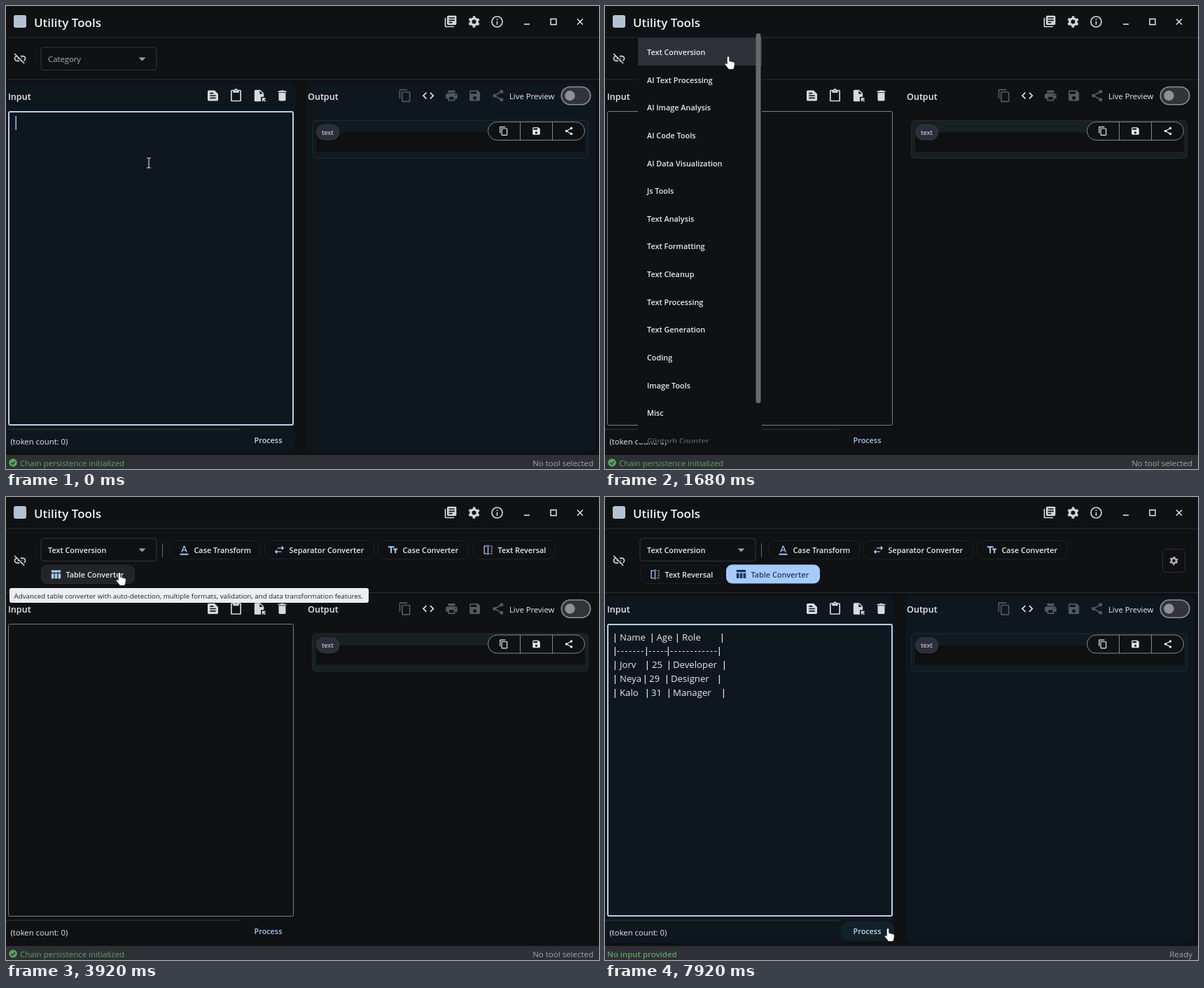
An HTML page that plays this animation: 847x661 px, repeating every 8 s.

```html
<!DOCTYPE html>
<html lang="en">
<head>
<meta charset="utf-8">
<title>Utility Tools</title>
<style>
  html, body { margin: 0; width: 100%; height: 100%; overflow: hidden; background: #0f1113; }
  svg { display: block; }
  text { font: 500 11.3px "Open Sans", "Noto Sans", sans-serif; fill: #e8eaee; white-space: pre; }
  text.title { font-size: 17px; font-weight: 600; fill: #f2f4f6; }
  text.head { font-size: 12.6px; font-weight: 600; }
  text.label { font-size: 10.85px; font-weight: 600; }
  text.status { font-size: 11.5px; fill: #5ea463; }
  text.strong { font-size: 11.4px; font-weight: 600; }
  text.end { text-anchor: end; fill: #a3a5ab; }
  text.tag { font-size: 9.5px; }
  text.tip { font-size: 9.8px; font-weight: 400; fill: #1f2226; }
  text.cell { font-size: 13.2px; }
  text.bar { font-size: 13.2px; font-weight: 600; text-anchor: middle; }
  text.rule { font-size: 13.2px; letter-spacing: 1.45px; }
  .line { fill: none; stroke: #2a2c30; }
  .chip rect { fill: transparent; stroke: #1e2226; }
  .chip { color: #a9c9f7; }
  .chip.hover rect { fill: #222428; stroke: #2a2c30; }
  .chip.on { color: #16365f; }
  .chip.on rect { fill: #a8cbfd; stroke: #a8cbfd; }
  .chip.on text { fill: #1c3c64; }
  .panel { fill: #0f171e; }
  .card { fill: #172120; stroke: #222b2c; }
  .tint .card { fill: #101b21; stroke: #1f2a30; }
  #process { fill: #a9c9f9; }
  .tint #process { fill: #c9d6e8; }
  #field { fill: none; stroke: #7b7e82; }
  .focus #field { stroke: #f0f2f4; }
  .tint #field { stroke: #b9cfee; }
</style>
</head>
<body>
<svg id="stage" width="847" height="661" viewBox="0 0 847 661"></svg>
<script>
const LOOP = 8000, STEP = 80;
const stage = document.getElementById('stage');

const glyphs = {
  library: 'M4 6H2v14c0 1.1.9 2 2 2h14v-2H4zM20 2H8c-1.1 0-2 .9-2 2v12c0 1.1.9 2 2 2h12c1.1 0 2-.9 2-2V4c0-1.1-.9-2-2-2zm-1 9H9V9h10zm-4 4H9v-2h6zm4-8H9V5h10z',
  unlink: 'M17 7h-4v1.9h4c1.7 0 3.1 1.4 3.1 3.1 0 1.4-1 2.6-2.3 3l1.4 1.4C20.900 15.600 22 14 22 12c0-2.800-2.200-5-5-5zm-1 4h-2.200l2 2h.2zM2 4.300l3.100 3.100C3.300 8.100 2 9.900 2 12c0 2.800 2.200 5 5 5h4v-1.900H7c-1.700 0-3.100-1.400-3.100-3.100 0-1.600 1.200-2.900 2.800-3.100l2 2.100H8v2h2.700l2.300 2.300V17h1.700l4 4 1.300-1.300L3.300 3z',
  note: 'M3 5v14c0 1.1.9 2 2 2h14c1.1 0 2-.9 2-2V9l-6-6H5c-1.1 0-2 .9-2 2zm4 2h6v2H7zm0 4h10v2H7zm0 4h10v2H7z',
  paste: 'M19 2h-4.200C14.400.8 13.300 0 12 0S9.600.8 9.200 2H5c-1.100 0-2 .9-2 2v16c0 1.100.9 2 2 2h14c1.100 0 2-.9 2-2V4c0-1.100-.9-2-2-2zm-7 0a1 1 0 1 1 0 2 1 1 0 0 1 0-2zm7 18H5V4h2v3h10V4h2z',
  open: 'M14 2H6c-1.1 0-2 .9-2 2v16c0 1.1.9 2 2 2h9v-8h5V8zm-1 7V3.500L18.500 9zM17 16h6v2h-2.500l3 3-1.500 1.500-3-3V22h-2z',
  bin: 'M6 19c0 1.1.9 2 2 2h8c1.1 0 2-.9 2-2V7H6zM19 4h-3.500l-1-1h-5l-1 1H5v2h14z',
  copy: 'M16 1H4c-1.1 0-2 .9-2 2v14h2V3h12zm3 4H8c-1.1 0-2 .9-2 2v14c0 1.1.9 2 2 2h11c1.1 0 2-.9 2-2V7c0-1.1-.9-2-2-2zm0 16H8V7h11z',
  code: 'M9.400 16.600L4.800 12l4.600-4.600L8 6l-6 6 6 6zM14.600 16.600l4.600-4.600-4.600-4.600L16 6l6 6-6 6z',
  print: 'M19 8H5c-1.700 0-3 1.300-3 3v6h4v4h12v-4h4v-6c0-1.700-1.300-3-3-3zm-3 11H8v-5h8zm3-7a1 1 0 1 1 0-2 1 1 0 0 1 0 2zM18 3H6v4h12z',
  save: 'M17 3H5c-1.1 0-2 .9-2 2v14c0 1.1.9 2 2 2h14c1.1 0 2-.9 2-2V7zm-5 16a3 3 0 1 1 0-6 3 3 0 0 1 0 6zm3-10H5V5h10z',
  letter: 'M3 20h18v3H3zM5.500 17h2.200l1.200-3.200h6.200l1.200 3.200h2.200L13 3h-2zM9.600 12L12 5.500 14.400 12z',
  swap: 'M22 8l-5-5v4H8v2h9v4zM2 16l5 5v-4h9v-2H7v-4z',
  sizes: 'M2 4v3h5v12h3V7h5V4zM13 9v3h3v7h3v-7h3V9z',
  mirror: 'M10 3H3v18h7v-2H5V5h5zM11 1h2v22h-2zM15 3h2v2h-2zM19 3h2v3h-2zM19 8h2v3h-2zM19 13h2v3h-2zM19 18h2v3h-2zM15 19h2v2h-2z',
  table: 'M2 3h20v5H2zM2 10h5.500v11H2zM9.300 10h5.400v11H9.300zM16.500 10H22v11h-5.500z'
};
const shapes = {
  gear: '<g fill="none" stroke="currentColor"><circle cx="12" cy="12" r="5.6" stroke-width="4"/><circle cx="12" cy="12" r="8.4" stroke-width="2.8" stroke-dasharray="4.2 4.6" stroke-dashoffset="-2.3"/></g>',
  info: '<circle cx="12" cy="12" r="9" fill="none" stroke="currentColor" stroke-width="2"/><path fill="currentColor" d="M11 7h2v2h-2zM11 11h2v6h-2z"/>',
  share: '<path d="M18 5L6 12l12 7" fill="none" stroke="currentColor" stroke-width="2"/><g fill="currentColor"><circle cx="18" cy="5" r="3"/><circle cx="6" cy="12" r="3"/><circle cx="18" cy="19" r="3"/></g>'
};

const icon = (name, x, y, size, color = 'currentColor') =>
  `<g color="${color}" transform="translate(${x - size / 2} ${y - size / 2}) scale(${size / 24})">` +
  (shapes[name] || `<path fill="currentColor" fill-rule="evenodd" d="${glyphs[name]}"/>`) + '</g>';
const text = (s, x, y, cls = '', extra = '') => `<text x="${x}" y="${y}" class="${cls}" ${extra}>${s}</text>`;
const box = (x, y, w, h, r, extra = '') => `<rect x="${x}" y="${y}" width="${w}" height="${h}" rx="${r}" ${extra}/>`;
const chip = (id, glyph, label, x, y, w) =>
  `<g id="${id}" class="chip" transform="translate(${x} ${y})">${box(.5, .5, w - 1, 26, 8)}` +
  icon(glyph, 21.5, 13.5, 16) + text(label, 35.5, 18, 'label') + '</g>';

const header = box(11, 13, 18, 18, 3, 'fill="#b3c2d3"') +
  text('Utility Tools', 40, 29.5, 'title') +
  icon('library', 635, 22, 20, '#d4d8dd') + icon('gear', 668.5, 22.5, 20, '#d4d8dd') + icon('info', 701.5, 22.5, 20, '#d4d8dd') +
  `<path d="M740 26h8M778 18.500h8v8h-8zM816 18.500l8 8M824 18.500l-8 8" fill="none" stroke="#e8eaec" stroke-width="1.4"/>
   <path d="M0 45h847" class="line"/>`;

const picker = box(50, 59, 165, 32.5, 4, 'fill="none" stroke="#33383d"') +
  text('Category', 60, 80, '', 'id="choice"') + '<path d="M189.500 73.500h10l-5 5z" fill="#9b9fa5"/>';

const chips = '<path d="M223.500 66v20" stroke="#62656a"/>' +
  chip('c1', 'letter', 'Case Transform', 233, 62, 131) +
  chip('c2', 'swap', 'Separator Converter', 369, 62, 157) +
  chip('c3', 'sizes', 'Case Converter', 531, 62, 130) +
  chip('reverse', 'mirror', 'Text Reversal', 667, 62, 118) +
  chip('table', 'table', 'Table Converter', 50, 97, 134);

const inputIcons = ['note', 'paste', 'open', 'bin'].map((n, i) => icon(n, 295.5 + 33 * i, 128, 20, '#d6dade')).join('');
const outputIcons = ['copy', 'code', 'print', 'save', 'share']
  .map((n, i) => icon(n, 570 + 33.2 * i, 128, 20, n === 'code' ? '#e0e3e7' : '#55595e')).join('');
const work = '<path d="M0 105h847" class="line"/>' +
  text('Input', 3, 133.5, 'head') + inputIcons +
  text('Output', 431, 133.5, 'head') + outputIcons + text('Live Preview', 719, 133) +
  box(793.3, 115.5, 41.4, 25.2, 12.6, 'fill="#33343a" stroke="#8f9098" stroke-width="1.6"') +
  '<circle cx="805.5" cy="128" r="7.2" fill="#8f9098"/>' +
  box(437.5, 163.5, 394, 54, 5, 'class="card"') +
  box(443, 180.5, 384, 27.5, 3, 'fill="#0e1011"') +
  box(444, 169.5, 31.5, 21.5, 10, 'fill="#2d2e3b" stroke="#393b47"') + text('text', 451, 183.5, 'tag') +
  box(688.5, 165.5, 138, 26, 13, 'fill="#0f1113" stroke="#85888d"') +
  '<path d="M734.500 165.500v26M780.500 165.500v26" stroke="#85888d"/>' +
  ['copy', 'save', 'share'].map((n, i) => icon(n, 711 + 46.5 * i, 178.5, 14, '#eceef0')).join('');

// Per row: bar positions, then cells as x and word, or x and dash count
const rows = [
  [[14, 67, 103, 167], [[21, 'Name'], [73.5, 'Age'], [110, 'Role']]],
  [[14, 59, 90, 163], [[17, 7], [62, 5], [93, 12]]],
  [[14, 60, 91, 170], [[21, 'Jorv'], [67, '25'], [97, 'Developer']]],
  [[14, 57, 88, 163], [[21, 'Neya'], [63, '29'], [94, 'Designer']]],
  [[14, 60, 91, 169], [[21, 'Kalo'], [66, '31'], [97, 'Manager']]]
];
const pasted = rows.map(([bars, cells], i) => {
  const y = 204.5 + 19.8 * i;
  return bars.map(x => text('|', x + .5, y, 'bar')).join('') + cells.map(([x, s]) =>
    typeof s === 'number' ? text('-'.repeat(s), x, y, 'rule') : text(s, x, y, 'cell')).join('');
}).join('');

const items = ['Text Conversion', 'AI Text Processing', 'AI Image Analysis', 'AI Code Tools', 'AI Data Visualization',
  'Js Tools', 'Text Analysis', 'Text Formatting', 'Text Cleanup', 'Text Processing', 'Text Generation',
  'Coding', 'Image Tools', 'Misc', 'Glintorb Counter'];
const menu = box(47, 39, 177, 585, 2, 'fill="#0f1113"') + '<g id="items">' +
  box(47, 45, 177, 40, 0, 'fill="#303138"') +
  items.map((s, i) => text(s, 60, 70 + 39.64 * i, 'label', i === 14 ? 'opacity=".35"' : '')).join('') +
  box(215.5, 39, 7, 528, 3.5, 'fill="#69696c"') + '</g>';

stage.innerHTML = `
  <defs><clipPath id="grow"><rect id="reveal" x="47" width="177"/></clipPath></defs>
  <rect width="847" height="661" fill="#0f1113"/>
  <g id="panels">${box(0, 110, 413, 526, 9, 'class="panel"')}${box(429, 110, 413, 526, 9, 'class="panel"')}</g>
  ${header}
  <g id="link">${icon('unlink', 20, 75, 20, '#d4d8dd')}</g>
  ${picker}<g id="chips">${chips}</g>
  <g id="options">${box(796.5, 74.5, 32, 33, 5, 'fill="none" stroke="#2e3034"')}${icon('gear', 812.5, 91, 15, '#b9adbd')}</g>
  <g id="work">${work}</g>
  <rect id="field" rx="2"/>
  <g id="pasted">${pasted}</g>
  <rect id="caret" width="1.4" fill="#b4cbee"/>
  <path d="M0 604.500h335" stroke="#23302c" stroke-width="1.5"/>
  <g id="glow">${box(336, 606, 77, 27, 13, 'fill="#13212a"')}</g>
  ${text('(token count: 0)', 6.5, 625.5)}
  ${text('Process', 354.5, 624, 'label', 'id="process"')}
  <rect y="641" width="847" height="20" fill="#2f3036"/>
  <g id="before">
    <circle cx="10" cy="652" r="5.8" fill="#58a55d"/>
    <path d="M7.300 652.200l2 2 3.600-3.900" fill="none" stroke="#24302a" stroke-width="1.3"/>
    ${text('Chain persistence initialized', 20, 656.5, 'status')}${text('No tool selected', 839, 656.5, 'status end')}
  </g>
  <g id="after">${text('No input provided', 3, 656.5, 'status strong')}${text('Ready', 839, 656.5, 'status end')}</g>
  <g id="menu" clip-path="url(#grow)">${menu}</g>
  <g id="tip">${box(5, 130, 513, 21, 3, 'fill="#eceef2"')}
    ${text('Advanced table converter with auto-detection, multiple formats, validation, and data transformation features.', 11.5, 144.5, 'tip')}</g>
  <g id="pointer">
    <path id="arrow" d="M0 0V14.500l3.400-3.200 2.300 5.200 2.200-1-2.300-5h4.600z" fill="#fff" stroke="#111" stroke-width=".7"/>
    <path id="hand" d="M-1.700 1.500a1.700 1.700 0 0 1 3.400 0V6.500l5.500 1.300q2.400.6 2.200 2.800l-.9 5.400q-.4 2.500-2.600 2.500H2q-1.300 0-2.200-1.200l-4.300-5.500q-.8-1.600.7-2.100l2.100 1z" fill="#fff" stroke="#111" stroke-width=".7"/>
    <path id="beam" d="M-3-7h2.200l.8.700.8-.7H3M0-6.300V6.300M-3 7h2.200l.8-.7.8.7H3" fill="none" stroke="#cfd2d6" stroke-width="1.2"/>
  </g>`;

const el = {};
stage.querySelectorAll('[id]').forEach(n => el[n.id] = n);
const assign = (node, attrs) => { for (const k in attrs) node.setAttribute(k, attrs[k]); };
const set = (id, attrs) => assign(el[id], attrs);
const show = (id, on) => el[id].style.display = on ? '' : 'none';
const move = (id, x, y) => set(id, { transform: `translate(${x} ${y})` });
const clamp = v => Math.max(0, Math.min(1, v));
const within = (t, a, b) => t >= a && t < b;

// Pointer path: time, x, y
const path = [[0, 204, 224], [400, 184, 129], [560, 184, 129], [800, 176, 72], [2480, 176, 72], [3200, 175, 96],
  [3440, 175, 96], [3760, 162, 108], [4720, 162, 108], [5120, 132, 237], [5920, 132, 237], [6320, 290, 470],
  [7680, 290, 470], [7920, 404, 616], [LOOP, 404, 616]];

function pointerAt(t) {
  const i = path.findIndex(p => p[0] > t);
  const [t0, x0, y0] = path[i - 1], [t1, x1, y1] = path[i];
  const k = (t - t0) / (t1 - t0), e = k * k * (3 - 2 * k);
  return [x0 + (x1 - x0) * e, y0 + (y1 - y0) * e];
}

function draw(t) {
  const tools = t >= 2160, picked = t >= 4240, filled = t >= 7280;
  const focus = t < 880 || t >= 5120, tint = t < 880 || t >= 5280;
  const drop = tools ? 31.5 : 0, top = tools ? 181.5 : 150.5;

  stage.classList.toggle('focus', focus);
  stage.classList.toggle('tint', tint);
  show('panels', tint);
  for (const panel of el.panels.children) assign(panel, { y: 110 + drop, height: 526 - drop });
  move('work', 0, drop);
  move('link', 0, drop / 2);
  // The outer edge of the border stays put as it thickens
  const edge = tint ? 2 : 1, half = edge / 2;
  set('field', { x: 3 + half, y: top - .5 + half, width: 408 - edge, height: 599.5 - top - edge, 'stroke-width': edge });

  el.choice.textContent = t >= 2080 ? 'Text Conversion' : 'Category';
  el.choice.setAttribute('class', t >= 2080 ? 'label' : '');
  el.choice.style.fill = t >= 2080 ? '' : '#abaeb4';
  show('chips', tools);
  show('options', picked);
  move('reverse', picked ? 50 : 667, picked ? 97 : 62);
  move('table', picked ? 173 : 50, picked ? 96.5 : 97);
  show('before', !picked);
  show('after', picked);
  show('pasted', filled);

  const caretOn = t < 320 || within(t, 5120, 5680) || within(t, 6160, 7040) || within(t, 7280, 7760);
  show('caret', caretOn);
  set('caret', filled ? { x: 173.5, y: 270, height: 19 } : { x: 13.5, y: top + 6.5, height: 20 });

  show('menu', within(t, 880, 2080));
  const grow = clamp((t - 880) / 160);
  set('reveal', { y: 39 + 6 * (1 - grow), height: 40 + 545 * grow });
  el.menu.style.opacity = t >= 2000 ? .4 : clamp((t - 800) / 160);
  el.items.style.opacity = clamp((t - 960) / 240);

  show('tip', within(t, 3840, 4240));
  el.tip.style.opacity = clamp((t - 3760) / 160);

  const [x, y] = pointerAt(t);
  const onChip = tools && y >= 97 && y < 123 && x > 50 && x < 183;
  const onPicker = y >= 59 && y < 91.5 && x > 50 && x < 215;
  const onProcess = y > 605 && y < 634 && x > 336 && x < 413;
  const onField = y > top && y < 599 && x < 410;
  const kind = onChip || onPicker || onProcess ? 'hand' : onField ? 'beam' : 'arrow';
  for (const k of ['arrow', 'hand', 'beam']) show(k, k === kind);
  move('pointer', x, y);
  show('glow', onProcess);
  el.table.classList.toggle('hover', onChip && !picked);
  el.table.classList.toggle('on', picked);
  el.reverse.classList.toggle('hover', onChip && picked);
}

const start = performance.now();
function tick() {
  const t = (performance.now() - start) % LOOP;
  draw(Math.floor(t / STEP) * STEP);
  requestAnimationFrame(tick);
}
tick();
</script>
</body>
</html>
```
